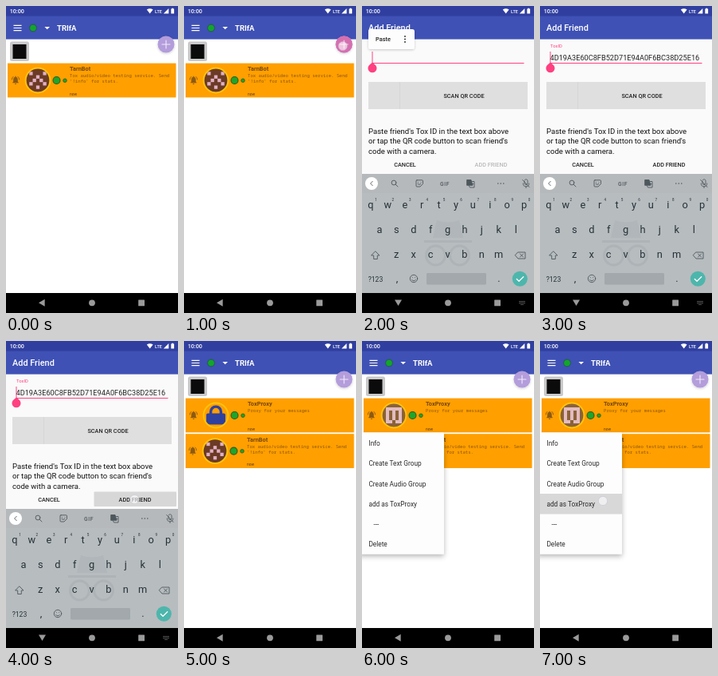
These frames come from a looping animation (216 by 384 pixels, 8 s). An HTML page:

```html
<!DOCTYPE html>
<html lang="en">
<head>
<meta charset="utf-8">
<title>Adding a friend</title>
<style>
  html, body { margin: 0; width: 100%; height: 100%; overflow: hidden; background: #fff; }
  svg { display: block; width: 100vw; height: 100vh; font-family: Roboto, sans-serif; }
  .med { font-weight: 500; }
  .mid { text-anchor: middle; }
  .name { font: bold 7.4px Roboto, sans-serif; fill: #75470b; }
  .mono { font: 5.65px "Noto Sans Mono", monospace; fill: #8a560c; }
  .when { font-size: 4.9px; fill: #5c3a0c; }
  .line { fill: none; stroke-linecap: round; stroke-linejoin: round; }
  .touch { fill: #fff; fill-opacity: .6; stroke: #b9b9d0; stroke-opacity: .6; stroke-width: .7; }
</style>
</head>
<body>
<svg viewBox="0 0 216 384">
  <defs>
    <filter id="soft" x="-20%" y="-20%" width="140%" height="140%">
      <feDropShadow dx="0" dy="1" stdDeviation="1.5" flood-opacity=".2"/>
    </filter>
    <filter id="deep" x="-20%" y="-20%" width="140%" height="140%">
      <feDropShadow dx="0" dy="3" stdDeviation="3" flood-opacity=".28"/>
    </filter>
    <clipPath id="disc"><circle r="14.6"/></clipPath>
    <clipPath id="field"><rect x="12" y="55" width="192" height="18"/></clipPath>
    <g id="bell" fill="#8b5a14">
      <path d="M-3.7 3.2V2.5L-2.8 1.6V-1C-2.8-2.9-1.8-4-.6-4.3V-5.2H.6V-4.3C1.8-4 2.8-2.9 2.8-1V1.6L3.7 2.5V3.2ZM-1.1 4H1.1A1.1 1.1 0 0 1-1.1 4Z"/>
      <path class="line" stroke="#8b5a14" stroke-width=".9" d="M-4.7-1Q-4.6-3.4-3-4.6M4.7-1Q4.6-3.4 3-4.6"/>
    </g>
    <g id="status">
      <use href="#bell" x="12" y="93"/>
      <g fill="#1fa52c" stroke="#35591a">
        <circle cx="63.5" cy="93" r="4.5" stroke-width="1.1"/>
        <circle cx="74" cy="93.2" r="2.3" stroke-width=".8"/>
      </g>
      <text class="when" x="80" y="111.6">now</text>
    </g>
    <rect id="card" x="2" y="71.6" width="211.5" height="42.8" fill="#ff9f00"/>
    <circle id="ring" r="15.4" fill="none" stroke="#ffc30f" stroke-width="2"/>
    <g id="bot">
      <use href="#status"/>
      <g transform="translate(40 93)">
        <circle r="15" fill="#6c3b25"/>
        <g id="botCells" fill="#dfb0c5" clip-path="url(#disc)"></g>
        <use href="#ring"/>
      </g>
      <text class="name" x="80" y="81">TarnBot</text>
      <text class="mono" x="80" y="89.4">Tox audio/video testing service. Send</text>
      <text class="mono" x="80" y="96">'!info' for stats.</text>
    </g>
    <path id="plus" class="line" stroke-width="1.1" d="M196 48H206M201 43V53"/>
  </defs>

  <rect width="216" height="384" fill="#fff"/>

  <!-- friend list -->
  <g data-on="01567">
    <rect y="12" width="216" height="29.6" fill="#3f51b5"/>
    <path stroke="#fff" stroke-width="1.1" d="M9.5 24.4H19.5M9.5 27.5H19.5M9.5 30.6H19.5"/>
    <circle cx="34" cy="27.5" r="4.4" fill="#12a62d" stroke="#245b45"/>
    <path d="M48.4 26H55L51.7 29.3Z" fill="#fff"/>
    <text x="64" y="31" font-size="9.5" font-weight="700" fill="#fff">TRIfA</text>
    <rect x="5" y="44.5" width="24" height="24.5" rx="2.5" fill="#c9c9c9"/>
    <rect x="8.5" y="48" width="17" height="18" fill="#0b0b0b"/>
    <use href="#card"/>
  </g>
  <use href="#bot" data-on="01"/>

  <g data-on="567">
    <use href="#status"/>
    <text class="name" x="80" y="81">ToxProxy</text>
    <text class="mono" x="80" y="89.4">Proxy for your messages</text>
    <use href="#card" y="44.6"/>
    <use href="#bot" x="-1" y="44.6"/>
  </g>
  <g data-on="5" transform="translate(40 93)">
    <g clip-path="url(#disc)">
      <rect x="-12" y="-2.5" width="24" height="14" rx="2" fill="#2f419f"/>
      <path d="M-6.4-2V-4.5A6.4 6.4 0 0 1 6.4-4.5V-2" fill="none" stroke="#2f419f" stroke-width="3.4"/>
    </g>
    <use href="#ring"/>
  </g>
  <g data-on="67" transform="translate(40 93)">
    <circle r="15" fill="#8a6238"/>
    <g id="proxyCells" fill="#e2bcc0" clip-path="url(#disc)"></g>
    <use href="#ring"/>
  </g>

  <g data-on="01567">
    <circle cx="201" cy="48" r="10.5" fill="#b39ddb" filter="url(#soft)"/>
    <use href="#plus" stroke="#f1eafa"/>
  </g>
  <g data-on="1">
    <circle cx="201" cy="48" r="10.5" fill="#d66fb0"/>
    <use href="#plus" stroke="#f6dcec"/>
    <circle class="touch" cx="199.5" cy="50" r="5.6"/>
  </g>

  <!-- context menu -->
  <g data-on="67">
    <rect x="-4" y="114.5" width="107" height="152" rx="1" fill="#fdfdfd" filter="url(#deep)"/>
    <rect data-on="7" y="191" width="103" height="25.5" fill="#d8d8d8"/>
    <g id="menu" font-size="8.3" fill="#2a2a2a"></g>
    <circle class="touch" data-on="7" cx="79" cy="200" r="5.6"/>
  </g>

  <!-- add friend form -->
  <g data-on="234">
    <rect y="41" width="216" height="318" fill="#fafafa"/>
    <rect y="12" width="216" height="29.6" fill="#3f51b5"/>
    <text class="med" x="8" y="31" font-size="10.9" fill="#fff">Add Friend</text>
    <path d="M12.5 71.5H203.5" stroke="#ff4081"/>
    <g data-on="34">
      <text x="13" y="52.3" font-size="5.9" fill="#ff4081">ToxID</text>
      <text x="12.5" y="67.8" font-size="9.2" fill="#222" clip-path="url(#field)">4D19A3E60C8FB52D71E94A0F6BC38D25E16</text>
    </g>
    <path d="M13 57V71" stroke="#ff4081"/>
    <path d="M13 70.6L17 74.1A5.5 5.5 0 1 1 9 74.1Z" fill="#ff4081"/>
    <rect x="8" y="95" width="200" height="34" fill="#dfdfdf"/>
    <path d="M47.5 95V129" stroke="#d3d3d3" stroke-width=".7"/>
    <g class="med mid" font-size="7.3" fill="#222">
      <text x="128" y="114.6">SCAN QR CODE</text>
      <text x="54" y="200.8">CANCEL</text>
    </g>
    <g font-size="9.55" fill="#111">
      <text x="8" y="159.6">Paste friend's Tox ID in the text box above</text>
      <text x="8" y="172.1">or tap the QR code button to scan friend's</text>
      <text x="8" y="184.6">code with a camera.</text>
    </g>
    <rect data-on="4" x="110.5" y="188.5" width="103.5" height="18.5" rx="1" fill="#d7d7d7"/>
    <g class="med mid" font-size="7.3">
      <text data-on="2" x="162" y="200.8" fill="#b9b9b9">ADD FRIEND</text>
      <text data-on="34" x="162" y="200.8" fill="#222">ADD FRIEND</text>
    </g>
    <circle class="touch" data-on="4" cx="161.5" cy="198" r="5.6"/>
    <g data-on="2">
      <rect x="8" y="29" width="58" height="25" rx="3" fill="#fdfdfd" filter="url(#soft)"/>
      <text class="med" x="17" y="44" font-size="7.4" fill="#222">Paste</text>
      <path class="line" stroke="#222" stroke-width="1.8" d="M54 38h0M54 41.5h0M54 45h0"/>
    </g>

    <!-- keyboard -->
    <rect y="210" width="216" height="149" fill="#b7bcbf"/>
    <rect y="210" width="216" height="24" fill="#b6b9bb"/>
    <g fill="none" stroke="#adb3b6" stroke-width="3">
      <path d="M89 290L94 268Q108 273 122 268L127 290Z" fill="#b0b6b9" stroke="none"/>
      <path d="M78 294.5H138"/>
      <circle cx="92.5" cy="312" r="12"/><circle cx="122.5" cy="312" r="12"/>
      <path d="M104 310Q107.5 307 111 310"/>
    </g>
    <g id="keys" class="mid" fill="#263238"></g>
    <circle cx="12" cy="222" r="8" fill="#fff"/>
    <g class="line" stroke="#4d585e" stroke-width=".9">
      <path d="M13.3 219.3L10.6 222L13.3 224.7"/>
      <circle cx="40" cy="221" r="2.9"/><path d="M42.3 223.3L45 226"/>
      <path d="M69 217.8H75.5Q76.5 217.8 76.5 218.8V222.5L73 226H69Q68 226 68 225V218.8Q68 217.8 69 217.8ZM70.5 220.5h0M74 220.5h0M70 222.5Q72 224.5 74 222.5"/>
      <path d="M132 217.5H137L139 224.3H132Z" fill="#4d585e"/>
      <path d="M138.5 219.5H141V227H135.5L134.5 225M138.5 222.5H140"/>
      <path stroke-width="1.6" d="M170.8 222h0M174.3 222h0M177.8 222h0"/>
      <path d="M204 219V221.5A2 2 0 0 0 208 221.5V218.5A2 2 0 0 0 204.5 217.5M202.2 222A3.8 3.8 0 0 0 209.8 222M206 226V227.5M201.7 217.5L210 226.5"/>
      <path d="M17 307L22 312H19.3V316.5H14.7V312H12Z"/>
      <path d="M196 308H205V316H196L192.5 312ZM198.5 310L202.5 314M202.5 310L198.5 314"/>
      <circle cx="65" cy="341" r="4.7"/><path d="M63.3 339.6h0M66.7 339.6h0M62.6 342.5Q65 345.3 67.4 342.5"/>
    </g>
    <rect x="81" y="334" width="75" height="14.5" rx="1.5" fill="#a2a8ab"/>
    <circle cx="198.3" cy="341.3" r="9.5" fill="#4db6ac"/>
    <path class="line" stroke="#fff" stroke-width="1.3" d="M194.3 341.5L197.1 344.3L202.7 338.7"/>
  </g>

  <!-- system bars -->
  <rect width="216" height="12.6" fill="#303f9f"/>
  <g fill="#fff">
    <text class="med" x="4.7" y="9.4" font-size="7.2">10:00</text>
    <path d="M176.8 4.5Q180.7 1.8 184.6 4.5L180.7 9.6Z"/>
    <text class="med" x="187" y="9.2" font-size="5.5">LTE</text>
    <path d="M204.3 3V9.5H197.8Z"/>
    <path d="M207.3 3.6H208.3V2.8H210.1V3.6H211.1V9.6H207.3Z"/>
  </g>
  <rect y="359" width="216" height="25" fill="#000"/>
  <g fill="#9a9a9a">
    <path data-on="01567" d="M41 371.3L48.7 366.8V375.8Z"/>
    <g data-on="234">
      <path d="M41 367.5H50L45.5 375Z"/>
      <path class="line" stroke="#666" stroke-width=".9" stroke-dasharray="1 1" d="M197.5 369.5H205.5M197.5 371.5H205.5M199.5 373.5H203.5"/>
    </g>
    <circle cx="108" cy="371.3" r="3.9"/>
    <rect x="166.2" y="367.4" width="7.8" height="7.8" rx=".5"/>
  </g>
</svg>
<script>
const STEP = 1000, STEPS = 8;
const byId = id => document.getElementById(id);

function add(parent, tag, attrs, text = '') {
  const el = document.createElementNS('http://www.w3.org/2000/svg', tag);
  for (const k in attrs) el.setAttribute(k, attrs[k]);
  el.textContent = text;
  parent.append(el);
}

function cells(id, rows, size) {
  rows.forEach((row, r) => [...row].forEach((c, i) => {
    if (c === '#') add(byId(id), 'rect', {
      x: (i - row.length / 2) * size, y: (r - rows.length / 2) * size, width: size, height: size
    });
  }));
}
cells('botCells', ['#...#', '..#..', '.#.#.', '#...#', '..#..'], 4.3);
cells('proxyCells', ['#####', '#.#.#', '#.#.#', '#.#.#', '##.##'], 4);

['Info', 'Create Text Group', 'Create Audio Group', 'add as ToxProxy', '---', 'Delete']
  .forEach((label, i) => add(byId('menu'), 'text', { x: label === '---' ? 14.4 : 8.4, y: 131.2 + i * 25.2 }, label));

const key = (label, x, y, size = 12.8) => add(byId('keys'), 'text', { x, y, 'font-size': size }, label);
[['qwertyuiop', 11, 253], ['asdfghjkl', 22, 284], ['zxcvbnm', 43.3, 315]].forEach(([row, x, y]) =>
  [...row].forEach((c, i) => key(c, x + i * 21.4, y)));
[...'1234567890'].forEach((c, i) => key(c, 17.5 + i * 21.4, 243.5, 4.6));
key('?123', 17, 345, 8.6);
key(',', 44, 345);
key('.', 172, 345);
add(byId('keys'), 'text', { x: 104, y: 224.5, 'font-size': 6.8, 'font-weight': 500, 'letter-spacing': .5, fill: '#4d585e' }, 'GIF');

// each part is shown only during the listed one-second steps
document.querySelectorAll('[data-on]').forEach(el => {
  const shown = i => +el.dataset.on.includes(i % STEPS);
  const frames = Array.from({ length: STEPS + 1 }, (_, i) =>
    ({ opacity: shown(i), offset: i / STEPS, easing: 'steps(1, end)' }));
  const anim = el.animate(frames, { duration: STEP * STEPS, iterations: Infinity });
  anim.startTime = 0;
});
</script>
</body>
</html>
```
